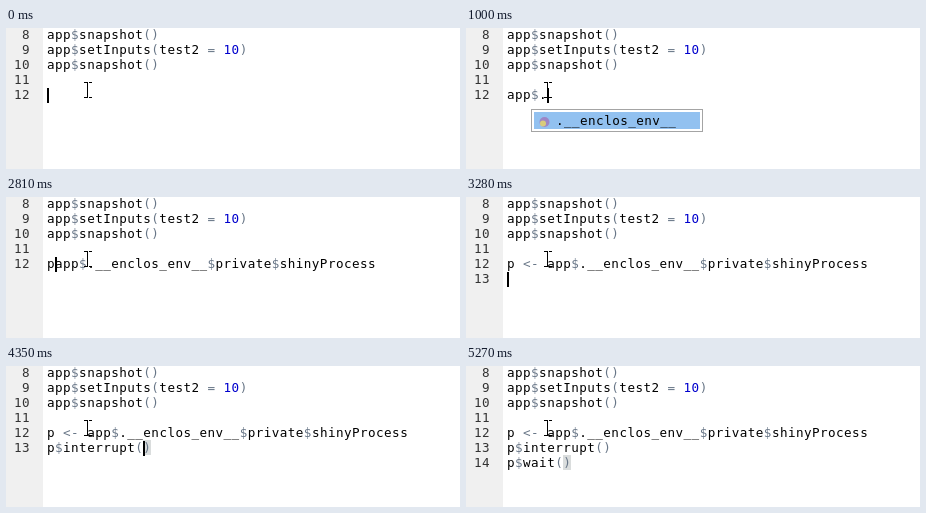
These frames come from a looping animation (454 by 141 pixels, 5.34 s). An HTML page:

```html
<!DOCTYPE html>
<html lang="en">
<head>
<meta charset="utf-8">
<title>Editor completion</title>
<style>
html, body { margin: 0; width: 100%; height: 100%; overflow: hidden; background: #fff; }
#stage {
  position: relative; width: 454px; height: 141px; overflow: hidden; background: #fff;
  font: 12.6px/15px "DejaVu Sans Mono", monospace; letter-spacing: .442px; color: #000; white-space: pre;
}
#gutter { position: absolute; left: 0; top: 0; width: 37px; height: 141px; background: #f0f0f0; }
.num { position: absolute; left: 0; width: 24px; text-align: right; color: #333; margin-top: -1px; }
.line { position: absolute; left: 41px; height: 15px; }
.line > span { position: relative; top: -1px; }
.op { color: #687687; }
.lit { color: #0000cd; }
.match { background: #dadddd; }
.caret { position: absolute; top: 1px; width: 2px; height: 15px; background: #000; }
.menu {
  position: absolute; box-sizing: border-box; padding: 1px; overflow: hidden;
  border: 1px solid #a4a4a4; background: #fff;
}
.item {
  position: relative; box-sizing: border-box; height: 19px; line-height: 17px;
  padding-left: 22px; border: 1px solid #fff;
}
.item:first-child { background: #92c1f0; }
.src { position: absolute; right: 11px; top: 0; color: #7d8790; }
.icon { position: absolute; left: 4px; top: 3px; width: 13px; height: 13px; }
.bar { position: absolute; right: 1px; top: 1px; bottom: 1px; width: 16px; background: #f1f1f1; }
.bar::before {
  content: ""; position: absolute; left: 4px; top: 5px;
  border: 4px solid transparent; border-top: 0; border-bottom: 5px solid #777;
}
.bar::after { content: ""; position: absolute; left: 1px; right: 1px; top: 14px; height: 60px; background: #c9c9c9; }
#mouse { position: absolute; left: 77px; top: 54px; }
</style>
</head>
<body>
<div id="stage">
  <div id="gutter"></div>
  <div id="view"></div>
  <svg id="mouse" width="10" height="16" fill="none" stroke="#000">
    <path d="M1 .5H4M6 .5H9M4.5 1V15M5 .5H4M1 15.5H4M6 15.5H9M5 15.5H4"/>
  </svg>
</div>
<script>
const CHAR = 8.027, ROW = 15, FIRST = 8, LEFT = 41;
const view = document.getElementById('view');

const tag = (fill, edge) =>
  `<path d="M1 8.5L7.5 2L12 5.5L5.5 12Z" fill="${fill}" stroke="${edge}"/>`;
const ICONS = {
  call: tag('#62bcc4', '#4f9fa8'),
  value: tag('#c9a9d6', '#9c7fae'),
  list: '<path d="M3 2l3 2.5-2.5 2.5-3-2.5z" fill="#e6b93a"/>' +
    '<path d="M9 4l3 2.5-2.5 2.5-3-2.5z" fill="#a777bd"/>' +
    '<path d="M7 8l3 2.5-2.5 2.5-3-2.5z" fill="#4fa9b8"/>',
  env: '<circle cx="6.5" cy="7" r="5" fill="#9d86c6"/><circle cx="5" cy="8.5" r="3" fill="#d9cc7c"/>'
};

// A completion list opens under the column where its token starts.
const menu = (col, names, icon, src = '', min = 0) => ({ col, names, icon, src, min });
const narrow = (m, start) => ({ ...m, min: 0, names: m.names.filter(n => n.startsWith(start)) });

const globals = menu(0, ['app', 'append', 'appendTab', 'apply'], 'call', '', 440);
const members = menu(4, ['checkUniqueWidgetNames', 'clone', 'enableDebugLogMessages',
  'executeScript', 'expectUpdate', 'findElement', 'findElements', 'findWidget', 'getAllValues'], 'call', 'app');
const dotted = menu(4, ['.__enclos_env__'], 'env');
const scopes = menu(20, ['private', 'self'], 'env');
const fields = menu(28, ['afterId', 'cleanLogs', 'eventLog', 'path', 'setupDebugging',
  'shinyProcess', 'shinyUrlPath', 'shinyWorker'], 'value', '', 230);
const methods = menu(2, ['as_ps_handle', 'clone', 'finalize', 'format', 'get_cmdline',
  'get_cpu_times', 'get_exe', 'get_output_connection', 'initialize', 'interrupt',
  'is_alive', 'wait', 'write_input'], 'call', 'p');

const ENV = 'app$.__enclos_env__', PRIV = ENV + '$private', PROC = PRIV + '$shinyProcess';
const DONE = { 8: 'app$snapshot()', 9: 'app$setInputs(test2 = 10)', 10: 'app$snapshot()', 11: '',
  12: 'p <- ' + PROC, 13: 'p$interrupt()' };

// Each step: ms, text of the current line, open list. "|" is the caret, "#" marks a matched bracket.
const STEPS = {
  12: [
    [70, '|'], [70, 'a|'], [80, 'ap|'], [80, 'app|'], [70, 'app|', globals], [80, 'app', globals],
    [80, 'app|', globals], [80, 'app$|'],
    [80, 'app$'], [80, 'app$|', members], [80, 'app$', members], [70, 'app$.|', members],
    [80, 'app$.|'], [70, 'app$.|', dotted], [80, 'app$.', dotted],
    [80, ENV + '|'], [70, ENV + '$|'], [70, ENV + '$|', scopes], [80, ENV + '$', scopes],
    [70, ENV + '$p|', scopes], [70, ENV + '$p|', narrow(scopes, 'p')], [80, PRIV + '|'], [70, PRIV],
    [80, PRIV + '$|'], [70, PRIV + '$|', fields], [80, PRIV + '$s|', fields],
    [80, PRIV + '$s|', narrow(fields, 's')], [70, PRIV + '$sh|', narrow(fields, 's')],
    [80, PRIV + '$sh|', narrow(fields, 'sh')], [80, PRIV + '$sh', narrow(fields, 'sh')],
    [80, PROC + '|'], [70, PROC], [80, PROC + '|'], [70, '|' + PROC], [80, PROC], [70, '|' + PROC],
    [80, PROC], [70, 'p|' + PROC],
    [80, 'p |' + PROC], [80, 'p <|' + PROC], [80, 'p <-|' + PROC], [80, 'p <- |' + PROC], [80, 'p <- ' + PROC]
  ],
  13: [
    [80, '|'], [80, ''],
    [70, 'p|'], [70, 'p'], [80, 'p$|'], [70, 'p$|', methods], [80, 'p$', methods], [70, 'p$|', methods],
    [80, 'p$i|', methods], [80, 'p$i|', narrow(methods, 'i')],
    [80, 'p$in|', narrow(methods, 'i')], [80, 'p$int|', narrow(methods, 'int')],
    [80, 'p$interrupt|'], [70, 'p$interrupt(|)'], [80, 'p$interrupt(|#)'], [70, 'p$interrupt(#)'],
    [70, 'p$interrupt()|']
  ],
  14: [
    [80, '|'],
    [80, 'p|'], [80, 'p$|'], [80, 'p$|', methods], [70, 'p$w|', methods], [80, 'p$w|', narrow(methods, 'w')],
    [80, 'p$wa|', narrow(methods, 'wa')], [70, 'p$wait(|)'],
    [80, 'p$wait(|#)'], [70, 'p$wait(#)']
  ]
};

const timeline = [];
let total = 0;
for (const row in STEPS)
  for (const [ms, text, list] of STEPS[row]) {
    timeline.push({ row: +row, text, list, end: total += ms });
  }

const span = (kind, text) => `<span class="${kind}">${text}</span>`;
const mark = part => {
  if (part === '|') return '<i class="caret"></i>';
  if (part === '#)') return span('op match', ')');
  if (/^\d+$/.test(part)) return span('lit', part);
  return /^(<-?|[$()=])$/.test(part) ? span('op', part.replace('<', '&lt;')) : part;
};
const paint = text => text.split(/(<-|#\)|[<$()=|]|\b\d+\b)/).map(mark).join('');

function lineHtml(row, text) {
  const top = (row - FIRST) * ROW;
  return `<div class="num" style="top:${top}px">${row}</div>` +
    `<div class="line" style="top:${top}px"><span>${paint(text)}</span></div>`;
}

function menuHtml({ col, names, icon, src, min }, row) {
  const scroll = src && names.length > 8;
  const longest = Math.max(...names.map(n => n.length));
  const tail = src ? 48 + CHAR * (src.length + 2) : 27;
  const width = Math.max(min, 25 + CHAR * longest + tail + (scroll ? 16 : 0));
  const items = names.map(n => {
    const kind = n === 'eventLog' ? 'list' : icon;
    const from = src ? span('src', `{${src}}`) : '';
    return `<div class="item" style="margin-right:${scroll ? 16 : 0}px">` +
      `<svg class="icon">${ICONS[kind]}</svg>${n}${from}</div>`;
  }).join('');
  const x = Math.round(LEFT + col * CHAR) - 8, y = (row - FIRST + 1) * ROW + 6;
  return `<div class="menu" style="left:${x}px;top:${y}px;width:${Math.round(width)}px;` +
    `height:${4 + 19 * names.length}px">${items}${scroll ? '<div class="bar"></div>' : ''}</div>`;
}

let shown;
function draw() {
  const now = performance.now() % total;
  const step = timeline.find(s => now < s.end);
  if (step !== shown) {
    shown = step;
    let html = '';
    for (let row = FIRST; row < step.row; row++) html += lineHtml(row, DONE[row]);
    html += lineHtml(step.row, step.text);
    if (step.list) html += menuHtml(step.list, step.row);
    view.innerHTML = html;
  }
  requestAnimationFrame(draw);
}
draw();
</script>
</body>
</html>
```
